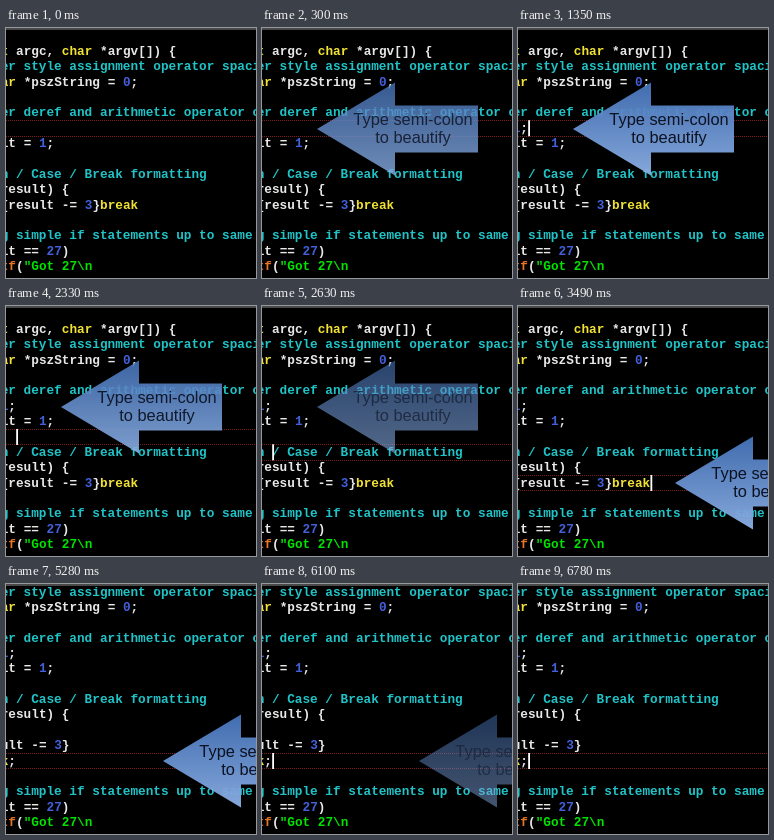
These frames come from a looping animation (250 by 250 pixels, 6980 ms). An HTML page with a canvas:

```html
<!DOCTYPE html>
<html>
<head>
<meta charset="utf-8">
<style>
  html, body { margin: 0; width: 100%; height: 100%; overflow: hidden; background: #000; }
  canvas { display: block; }
</style>
</head>
<body>
<canvas id="stage" width="250" height="250"></canvas>
<script>
const ctx = document.getElementById('stage').getContext('2d');
const LOOP = 6980, STEP = 60;
const CHAR = 7.64, PITCH = 15.35, CARET_X = 10, LEFT = CARET_X - 14 * CHAR, TOP = 15.5;
const rowTop = row => TOP + row * PITCH;
const clamp = v => Math.max(0, Math.min(1, v));

// Token groups: comment, string, keyword, function, number, anything else.
const TOKENS = /(\/\/.*)|(".*)|(\b(?:int|const|char|switch|case|break|if)\b)|(printf)|(\d+)|(\w+|[^\s\w])/g;
const COLORS = ['#20c4c8', '#00e400', '#f2e234', '#e87424', '#4260dc', '#e8e8e8'];

const head = [
  'int wmain(int argc, char *argv[]) {',
  '    // Pointer style assignment operator spacing',
  '    const char *pszString = 0;',
  '',
  '    // Pointer deref and arithmetic operator options'
];
const middle = [
  '    int result = 1;',
  '',
  '    // Switch / Case / Break formatting',
  '    switch (result) {'
];
const compact = ['    case 27:{result -= 3}break'];
const expanded = ['    case 27:', '        {result -= 3}', '        break;'];
const tail = [
  '',
  '    // Moving simple if statements up to same line',
  '    if (result == 27)',
  '        printf("Got 27\\n'
];

function drawLine(line, row) {
  for (const match of line.matchAll(TOKENS)) {
    const group = match.slice(1).findIndex(Boolean);
    ctx.fillStyle = COLORS[group];
    ctx.fillText(match[0], LEFT + match.index * CHAR, rowTop(row) + 11.5);
  }
}

function drawCode(t) {
  const typed = t >= 1350 ? '    value = 1;' : '    value=1';
  const block = t >= 4750 ? expanded : compact;
  const first = compact.length - block.length;
  ctx.font = `bold ${CHAR / 0.6}px "Liberation Mono", "Courier New", monospace`;
  ctx.textAlign = 'left';
  [...head, typed, ...middle, ...block, ...tail].forEach((line, i) => drawLine(line, first + i));
}

function drawCursor(t) {
  // The cursor walks down one row every 260 ms, from row 5 to row 10.
  const row = t < 2070 ? 5 : Math.min(10, 6 + Math.floor((t - 2070) / 260));
  const y = rowTop(row);
  ctx.fillStyle = '#7c1c1c';
  for (let x = 0; x < 250; x += 2) {
    ctx.fillRect(x, Math.round(y), 1, 1);
    ctx.fillRect(x, Math.round(y + PITCH), 1, 1);
  }
  const hidden = [[0, 1350], [1810, 2070], [4020, 4550], [5280, 5800], [6340, 6780]];
  if (hidden.some(([from, to]) => t >= from && t < to)) return;
  const column = t >= 3490 && t < 4750 ? 16 : 0;
  ctx.fillStyle = '#fff';
  ctx.fillRect(CARET_X + 0.2 + column * CHAR, y, 1.8, 16);
}

function drawArrow(tipX, tipY, alpha) {
  if (alpha <= 0) return;
  ctx.save();
  ctx.translate(tipX, tipY);
  const fill = ctx.createLinearGradient(0, -46, 0, 46);
  fill.addColorStop(0, '#4472b8');
  fill.addColorStop(1, '#8cb0e6');
  ctx.globalAlpha = alpha * 0.95;
  ctx.beginPath();
  [[0, 0], [78, -46.5], [78, -23.5], [161, -23.5], [161, 23.5], [78, 23.5], [78, 46.5]]
    .forEach(([x, y]) => ctx.lineTo(x, y));
  ctx.fillStyle = fill;
  ctx.fill();
  ctx.globalAlpha = alpha;
  ctx.fillStyle = '#0c1222';
  ctx.font = '16.4px "Liberation Sans", Arial, sans-serif';
  ctx.textAlign = 'center';
  ctx.fillText('Type semi-colon', 96, -4.5);
  ctx.fillText('to beautify', 96, 14);
  ctx.restore();
}

// Opacity rises from one moment, then falls over sixteen steps from another.
function fade(t, start, steps, end) {
  const count = from => Math.floor((t - from) / STEP) + 1;
  return clamp(count(start) / steps) * (1 - clamp(count(end) / 16));
}

function render(now) {
  const t = now % LOOP;
  ctx.fillStyle = '#000';
  ctx.fillRect(0, 0, 250, 250);
  drawCode(t);
  drawCursor(t);
  ctx.fillStyle = '#484848';
  ctx.fillRect(0, 0, 250, 2);
  drawArrow(55, 101, fade(t, 60, 6, 2330));
  drawArrow(157, 177, fade(t, 3050, 5, 5680));
}

const start = performance.now();
function tick() {
  render(performance.now() - start);
  requestAnimationFrame(tick);
}
tick();
</script>
</body>
</html>
```
